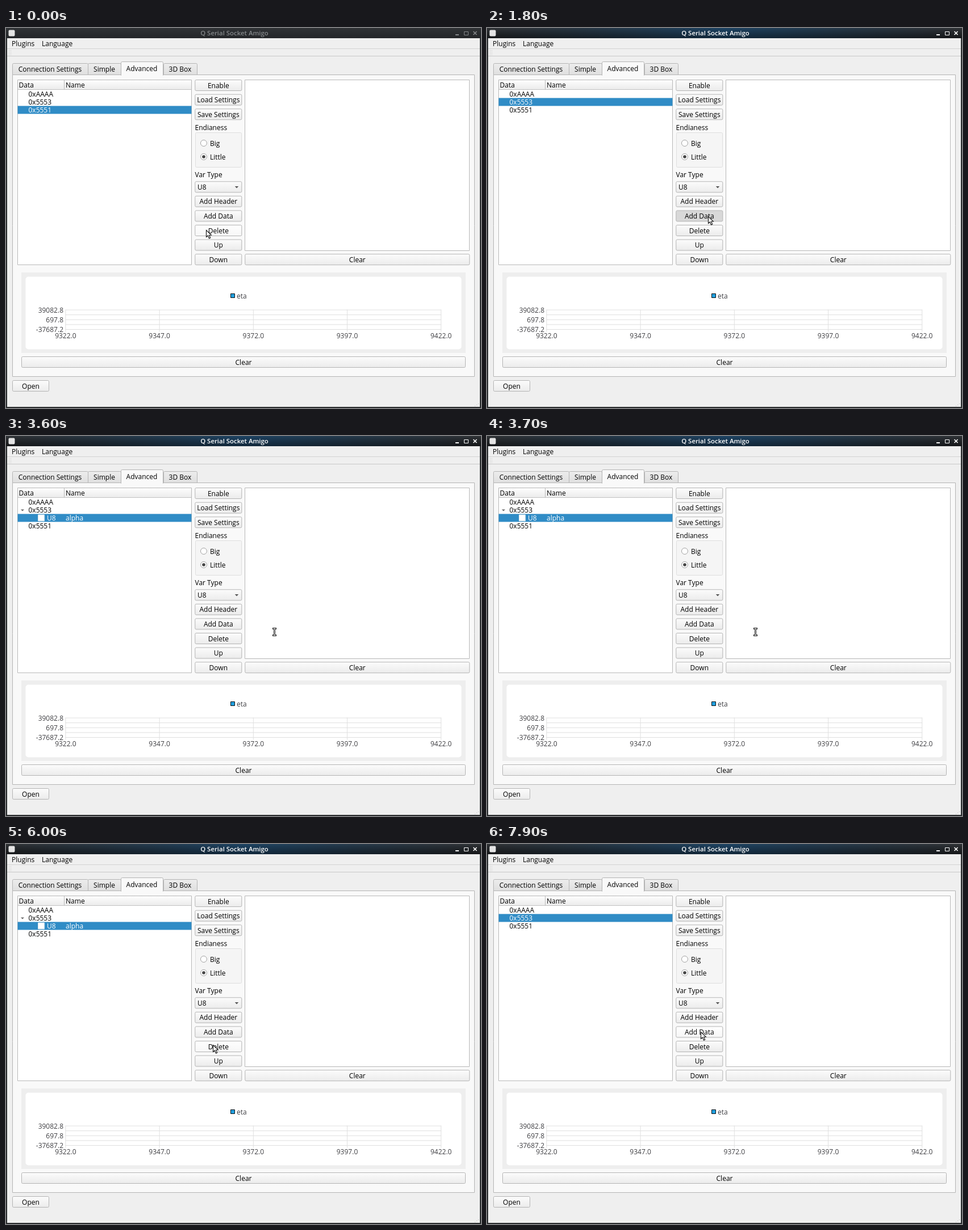
These frames come from a looping animation (836 px wide and 670 px high, 8000 ms). An HTML page with a canvas:

```html
<!DOCTYPE html>
<html lang="en">
<head>
<meta charset="utf-8">
<title>Serial settings demo</title>
<style>
  html, body { margin: 0; width: 100%; height: 100%; overflow: hidden; }
  canvas { display: block; }
</style>
</head>
<body>
<canvas id="stage" width="836" height="670"></canvas>
<script>
const ctx = document.getElementById('stage').getContext('2d');
const FONT = '500 12px "Open Sans", "Noto Sans", sans-serif';
const TITLE_FONT = '600 11.4px "Open Sans", "Noto Sans", sans-serif';
const BLUE = '#308cc6', BORDER = '#b4b4b4', PANEL = '#efefef', INK = '#000';
const LOOP = 8000, STEP = 100;

// Pointer path: time, x, y
const path = [
  [0, 352, 356], [400, 90, 128], [900, 90, 128], [1600, 391, 332], [1800, 389, 332],
  [2000, 389, 332], [2300, 414, 327], [3000, 414, 327], [3400, 472, 345], [3800, 472, 345],
  [4600, 100, 131], [5000, 100, 131], [5600, 398, 395], [5900, 371, 365], [6000, 364, 354],
  [6200, 364, 354], [7000, 324, 234], [7400, 415, 336], [7600, 382, 333],
  [7700, 382, 333], [7900, 376, 331], [8000, 376, 331]
];

function pointerAt(t) {
  const i = path.findIndex(p => p[0] > t);
  const [t0, x0, y0] = path[i - 1], [t1, x1, y1] = path[i];
  const u = (t - t0) / (t1 - t0), k = u * u * (3 - 2 * u);
  return { x: Math.round(x0 + (x1 - x0) * k), y: Math.round(y0 + (y1 - y0) * k) };
}

function fill(x, y, w, h, color) {
  ctx.fillStyle = color;
  ctx.fillRect(x, y, w, h);
}

function box(x, y, w, h, color, border = BORDER, r = 0) {
  ctx.beginPath();
  ctx.roundRect(x + .5, y + .5, w - 1, h - 1, r);
  ctx.fillStyle = color;
  ctx.fill();
  if (border) {
    ctx.strokeStyle = border;
    ctx.lineWidth = 1;
    ctx.stroke();
  }
}

function text(s, x, y, color = INK, align = 'left', font = FONT) {
  ctx.font = font;
  ctx.textAlign = align;
  ctx.fillStyle = color;
  ctx.fillText(s, x, y);
}

function shape(points, color, border, width = 1) {
  ctx.beginPath();
  points.forEach(([x, y]) => ctx.lineTo(x, y));
  ctx.closePath();
  if (color) { ctx.fillStyle = color; ctx.fill(); }
  if (border) { ctx.strokeStyle = border; ctx.lineWidth = width; ctx.stroke(); }
}

function line(x0, y0, x1, y1, color, width = 1) {
  ctx.beginPath();
  ctx.moveTo(x0, y0);
  ctx.lineTo(x1, y1);
  ctx.strokeStyle = color;
  ctx.lineWidth = width;
  ctx.stroke();
}

function disc(x, y, r, color, border) {
  ctx.beginPath();
  ctx.arc(x, y, r, 0, 7);
  ctx.fillStyle = color;
  ctx.fill();
  if (border) { ctx.strokeStyle = border; ctx.lineWidth = 1; ctx.stroke(); }
}

function gradient(y, h, top, bottom) {
  const g = ctx.createLinearGradient(0, y, 0, y + h);
  g.addColorStop(0, top);
  g.addColorStop(1, bottom);
  return g;
}

function button(label, x, y, w, h, state, border = BORDER) {
  const { x: px, y: py } = state.pointer;
  const hover = px >= x && px < x + w && py >= y && py < y + h;
  const face = hover && state.pressed === label ? '#d8d8d8'
    : hover ? gradient(y, h, '#ffffff', '#f6f6f6') : gradient(y, h, '#fcfcfc', '#ebebeb');
  box(x, y, w, h, face, border, 2);
  text(label, x + w / 2, y + h / 2 + 4.5, INK, 'center');
}

function titleBar(x, y, w, h, label, center, active) {
  fill(x, y, w, h, gradient(y, h, '#303336', '#242629'));
  if (active) {
    const g = ctx.createLinearGradient(x, 0, x + w, 0);
    g.addColorStop(0, '#1d3c5600');
    g.addColorStop(.5, '#1d4363');
    g.addColorStop(1, '#1d3c5600');
    fill(x, y, w, h, g);
    fill(x, y, w, h, gradient(y, h, '#00000000', '#00000066'));
  }
  const ink = active ? '#fff' : '#85888b';
  text(label, center, y + 13, ink, 'center', TITLE_FONT);
  box(x + 4, y + 3, 12, 12, '#e4e4e4', null, 2);
  return ink;
}

function closeMark(x, y, ink) {
  line(x - 3, y - 3, x + 3, y + 3, ink, 1.6);
  line(x - 3, y + 3, x + 3, y - 3, ink, 1.6);
}

function drawFrame(active) {
  fill(0, 0, 836, 670, '#292b2d');
  fill(2, 18, 832, 650, PANEL);
  const ink = titleBar(0, 0, 836, 18, 'Q Serial Socket Amigo', 402, active);
  fill(791, 11, 6, 2, ink);
  box(806, 6, 8, 7, 'transparent', ink);
  closeMark(825.5, 9, ink);
  text('Plugins', 10, 31.5);
  text('Language', 63, 31.5);
  fill(2, 36, 832, 1, '#d2d2d2');
  fill(2, 49, 832, 1, '#c8c8c8');
  for (let i = 0; i < 8; i++) fill(5 + i % 2 * 3, 39 + (i >> 1) * 2.5, 1, 1, '#c4c4c4');
  for (let i = 0; i < 3; i++) fill(831 - i * 3, 662 + i * 2, 1, 1, '#bbb');

  box(11, 82, 814, 533, '#f9f9f9');
  for (const [label, x, w] of [['Connection Settings', 11, 134], ['Simple', 144, 59], ['3D Box', 277, 60]]) {
    box(x, 62, w, 21, gradient(62, 21, '#ededed', '#dfdfdf'), BORDER, [2, 2, 0, 0]);
    text(label, x + w / 2 - .5, 77, INK, 'center');
  }
  box(202, 59, 75, 25, '#f9f9f9', BORDER, [2, 2, 0, 0]);
  fill(203, 82, 73, 3, '#f9f9f9');
  text('Advanced', 239, 76, INK, 'center');
}

function drawTree(rows) {
  box(20, 91, 307, 327, '#fff', '#b8b8b8');
  fill(21, 92, 305, 16, gradient(92, 16, '#fdfdfd', '#ececec'));
  fill(21, 108, 305, 1, '#c2c2c2');
  fill(102, 92, 1, 16, '#bcbcbc');
  text('Data', 22.5, 105);
  text('Name', 105, 105);
  rows.forEach(({ label, name, selected, open }, i) => {
    const y = 109.4 + i * 14, ink = selected ? '#fff' : INK;
    if (selected) fill(20.5, y, 306, 14, BLUE);
    if (open) shape([[26, y + 6], [32, y + 6], [29, y + 9]], '#666');
    if (name) {
      box(56, y + 1, 12, 12, '#fff', '#d5e3ec');
      text(name, 105, y + 11.4, ink);
    }
    text(label, name ? 72 : 39.5, y + 11.4, ink);
  });
}

function drawControls(state) {
  // Slots of the button column; the gap holds the option widgets
  const column = ['Enable', 'Load Settings', 'Save Settings', , , , , ,
    'Add Header', 'Add Data', 'Delete', 'Up', 'Down'];
  column.forEach((label, i) => button(label, 332.3, 91 + i * 25.6, 83, 20, state));
  text('Endianess', 332.5, 179.5);
  box(333, 184, 82, 62, '#f5f5f5', '#dedede', 2);
  ['Big', 'Little'].forEach((label, i) => {
    const y = 203 + i * 24;
    disc(348, y, 5.5, '#fff', '#a3a3a3');
    if (i) disc(348, y, 2.8, '#444');
    text(label, 359, y + 4.5);
  });
  text('Var Type', 332.5, 263);
  button('', 332.3, 270.3, 83, 20, state);
  text('U8', 337, 285);
  shape([[402.8, 279], [409.2, 279], [406, 282.4]], '#555');

  box(420, 91, 396, 302, '#fff', '#b8b8b8');
  button('Clear', 420.3, 398.2, 396, 20, state);
  button('Clear', 27, 579, 782, 20, state);
  button('Open', 11, 621, 65, 20, state);
}

function drawChart() {
  fill(27, 431, 782, 142, '#eeeeee');
  box(34, 438, 768, 129, '#fff', null, 5);
  box(395, 468, 8, 8, '#209fdf', '#111');
  const ink = '#404044';
  text('eta', 406, 476.5, ink);
  for (let i = 0; i < 5; i++) {
    const x = 104.4 + i * 165.2;
    fill(104.4, 496.6 + i * 8.6, 661.8, 1, '#dfdfdf');
    fill(x, 496.6, 1, 39, '#dfdfdf');
    text((9322 + i * 25).toFixed(1), x + .5, 546.5, ink, 'center');
  }
  ['39082.8', '697.8', '-37687.2'].forEach((s, i) => text(s, 101, 501.5 + i * 17.2, ink, 'right'));
}

function drawDialog(state) {
  ctx.save();
  ctx.shadowColor = '#000a';
  ctx.shadowBlur = 14;
  ctx.shadowOffsetY = 3;
  box(294, 266, 244, 100, '#292b2d', null, 3);
  ctx.restore();
  titleBar(295, 267, 242, 18, 'Please enter a name', 416, true);
  closeMark(526.5, 275.5, '#fff');
  fill(296, 285, 240, 79, PANEL);
  text('Variable Name', 313, 314.5);
  box(400, 300, 119, 20, '#fff', '#3a86b8', 2);
  fill(402, 303, 32, 14, BLUE);
  text('alpha', 402, 314.5, '#fff');
  if (state.caret) fill(433, 303, 1, 14, '#000');

  button('', 383, 337, 66, 20, state);
  disc(395.5, 346.5, 5.3, '#d80b16', '#8f8f8f');
  text('Cancel', 403, 351.5);
  button('', 453, 337, 66, 20, state, '#4a8cb5');
  shape([[471, 348], [476, 343], [476, 346], [479, 346], [479, 341], [483, 341],
    [482, 349], [476, 350], [476, 353]], '#71806a', '#4c5748', .8);
  text('OK', 485, 351.5);
}

function drawPointer({ x, y }, beam) {
  if (beam) {
    for (const [color, grow] of [['#222', 1], ['#eee', 0]]) {
      for (const [dx, dy, w, h] of [[-2, -6, 5, 1], [0, -6, 1, 12], [-2, 6, 5, 1]])
        fill(x + dx - grow, y + dy - grow, w + 2 * grow, h + 2 * grow, color);
    }
    return;
  }
  const arrow = [[.5, .5], [.5, 12.5], [3.3, 10], [5.5, 15], [7.7, 14], [5.5, 9.3], [9.3, 9]];
  shape(arrow.map(([dx, dy]) => [x + dx, y + dy]), '#fff', '#111', 1.1);
}

function render(t) {
  const pointer = pointerAt(t);
  const dialog = t >= 1900 && t < 3500;
  const added = t >= 3500 && t < 6300;
  const state = { pointer, caret: t < 2900, pressed: t === 1800 ? 'Add Data' : '' };
  const rows = [
    { label: '0xAAAA' },
    { label: '0x5553', selected: t >= 700 && !added, open: added },
    { label: '0x5551', selected: t < 700 }
  ];
  if (added) rows.splice(2, 0, { label: 'U8', name: 'alpha', selected: true });

  drawFrame(t >= 700 && !dialog);
  drawTree(rows);
  drawControls(state);
  drawChart();
  if (dialog) drawDialog(state);
  drawPointer(pointer, !dialog && pointer.x > 420 && pointer.y < 392);
}

function tick() {
  render(Math.floor(performance.now() % LOOP / STEP) * STEP);
  requestAnimationFrame(tick);
}
tick();
</script>
</body>
</html>
```
